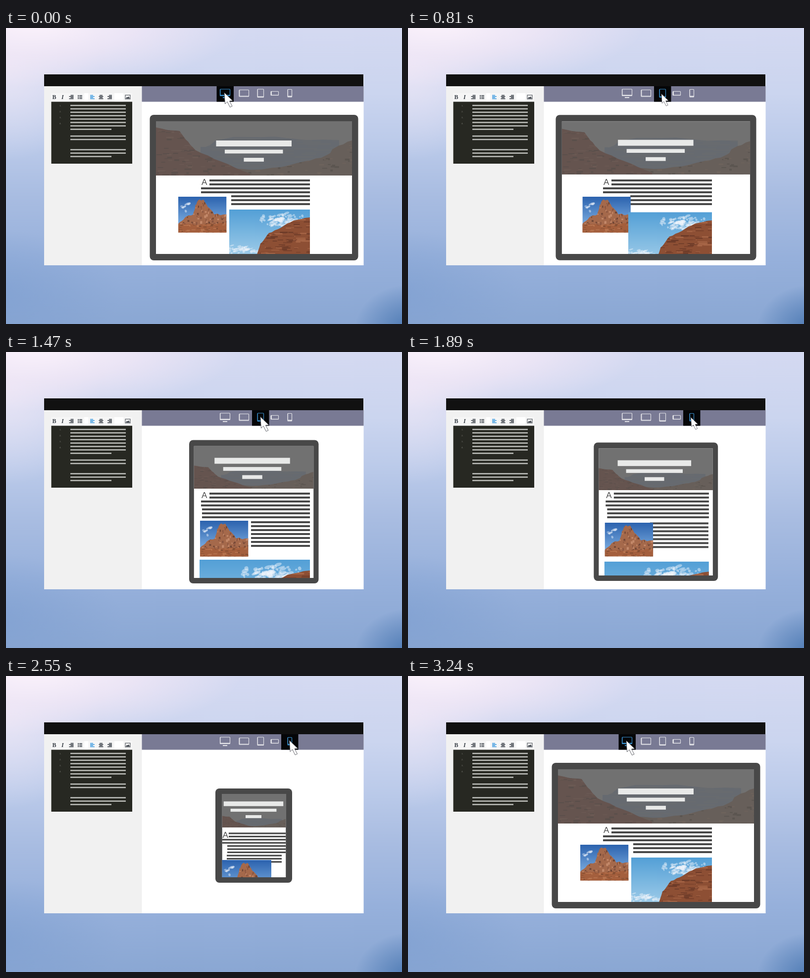
Animation of 800x600 px, one loop 3420 ms. Source, as an HTML page with a canvas:

```html
<!DOCTYPE html>
<html lang="en">
<head>
<meta charset="utf-8">
<title>Responsive preview</title>
<style>
html, body { margin: 0; width: 100%; height: 100%; overflow: hidden; }
body {
  background:
    radial-gradient(ellipse 110px 90px at 815px 610px, #4c79b3, #4c79b300),
    radial-gradient(ellipse 260px 130px at -30px 540px, #7d9ed0aa, #7d9ed000),
    radial-gradient(ellipse 420px 130px at 60px -10px, #fbf2fb, #f0e7f6cc 50%, #e6e1f400),
    radial-gradient(ellipse 190px 200px at 0 70px, #f1e9f7cc, #e6e3f400),
    linear-gradient(#d4d9f1, #cbd5ef 22%, #bccbea 38%, #a8bce1 57%, #96b0db 78%, #8aa7d3);
}
canvas { display: block; }
</style>
</head>
<body>
<canvas id="stage" width="800" height="600"></canvas>
<script>
const ctx = document.getElementById('stage').getContext('2d');
const LOOP = 3420, STEP = 30;
const DARK = '#484848', INK = '#3c424a', BLUE = '#398ecb';
const SERIF = '"Liberation Serif", Times, serif';

// Boxes are [left, top, right, bottom]. Each part of a layout moves in its own time span.
const desktop = {
  bezel: [290.5, 176, 711.5, 471],
  screen: { box: [303, 189, 699, 458], heroEnd: 299, heroScale: 1 },
  text: { y: 309, gap: 8 },
  content: {
    scale: 1, barX: 500.7, barY: 234, left: 394, wrap: 455, right: 614,
    butteX: 348, butteY: 342, butteW: 97.5, butteH: 72.5, cliffX: 451, cliffY: 368,
    sideX: 495, sideY: 345, sideR: 415, sideRows: 7
  }
};
const tablet = {
  bezel: [370, 178.5, 631.5, 469],
  screen: { box: [379.5, 190.5, 621.5, 458], heroEnd: 277, heroScale: .48 },
  text: { y: 287, gap: 8 },
  content: { ...desktop.content, barX: 497.5, barY: 220.5, wrap: 396, butteX: 392, cliffX: 391, cliffY: 421, sideR: 614 }
};
const phone = {
  bezel: [423, 228, 578, 419],
  screen: { box: [436.5, 239, 565.5, 408], heroEnd: 307, heroScale: .24 },
  text: { y: 319, gap: 6.4 },
  content: {
    scale: .79, barX: 500, barY: 259, left: 436.5, wrap: 447, right: 565,
    butteX: 436, butteY: 373, butteW: 100, butteH: 40, cliffX: 436, cliffY: 450,
    sideX: 446, sideY: 364, sideR: 557, sideRows: 3
  }
};

const resizes = [
  { from: desktop, to: tablet, bezel: [780, 1080], screen: [780, 1080], text: [810, 1080], content: [780, 1080] },
  { from: tablet, to: phone, bezel: [1860, 2160], screen: [1860, 2160], text: [1890, 2130], content: [1860, 2100] },
  { from: phone, to: desktop, bezel: [2940, 3240], screen: [3000, 3240], text: [3000, 3240], content: [3000, 3240] }
];
const spots = [[441, 131], [510.5, 131], [570, 130]];
const away = [745, 159];
const trips = [[310, 630], [1460, 1740], [2540, 2820]];
const clicks = [780, 1860, 2910];

const progress = (t, [a, b]) => Math.min(1, Math.max(0, (t - a) / (b - a)));
const smooth = u => u * u * (3 - 2 * u);

function mix(a, b, u) {
  if (typeof a === 'number') return a + (b - a) * u;
  if (Array.isArray(a)) return a.map((v, i) => mix(v, b[i], u));
  return Object.fromEntries(Object.keys(a).map(k => [k, mix(a[k], b[k], u)]));
}

function randomizer(seed) {
  return () => (seed = (seed * 16807) % 2147483647) / 2147483647;
}

function rect(l, t, r, b, fill) {
  ctx.fillStyle = fill;
  ctx.fillRect(l, t, r - l, b - t);
}
function line(l, r, y, thick, fill) {
  if (r > l) rect(l, y - thick / 2, r, y + thick / 2, fill);
}
function round(l, t, r, b, radius) {
  ctx.beginPath();
  ctx.roundRect(l, t, r - l, b - t, radius);
}
function poly(points, fill) {
  ctx.beginPath();
  points.forEach(([x, y]) => ctx.lineTo(x, y));
  ctx.closePath();
  ctx.fillStyle = fill;
  ctx.fill();
}
function text(str, x, y, font, fill) {
  ctx.font = font;
  ctx.fillStyle = fill;
  ctx.fillText(str, x, y);
}

// Shows a drawing made in its own units inside a box.
function picture([l, t, r, b], sx, sy, top, draw) {
  ctx.save();
  ctx.beginPath();
  ctx.rect(l, t, r - l, b - t);
  ctx.clip();
  ctx.translate(l, top);
  ctx.scale(sx, sy);
  draw();
  ctx.restore();
}
function sky(w, h, top, bottom) {
  const g = ctx.createLinearGradient(0, 0, 0, h);
  g.addColorStop(0, top);
  g.addColorStop(1, bottom);
  rect(0, 0, w, h, g);
}
function cloud(seed, n, x, y, w, h) {
  const rnd = randomizer(seed);
  for (let i = 0; i < n; i++) {
    ctx.beginPath();
    ctx.ellipse(x + (rnd() + rnd() - 1) * w, y + (rnd() + rnd() - 1) * h, 1 + rnd() * 5, 1 + rnd() * 2, -.3, 0, 7);
    ctx.fillStyle = '#f0f5fb77';
    ctx.fill();
  }
}

// Rock below a rough skyline through the key points, with random strata.
function rock(seed, keys, bottom, rough, [base, ...shades], w, h) {
  const rnd = randomizer(seed), skyline = [];
  const [x0] = keys[0], [x1] = keys.at(-1);
  keys.slice(1).forEach((end, i) => {
    for (let u = 0; u < 1; u += .25) {
      const [x, y] = mix(keys[i], end, u);
      skyline.push([x, y + (rnd() - .5) * rough]);
    }
  });
  ctx.save();
  poly([...skyline, keys.at(-1), [x1, bottom], [x0, bottom]], base);
  ctx.clip();
  for (let i = 0; i < 150; i++) {
    const x = x0 + rnd() * (x1 - x0), y = bottom * rnd();
    rect(x, y, x + w * (.4 + rnd()), y + h * (.4 + rnd()), shades[i % shades.length]);
  }
  ctx.restore();
}

function drawHero({ box: [l, t, r], heroEnd, heroScale }) {
  rect(l, t, r, heroEnd, '#717171');
  picture([l, t, r, heroEnd], (r - l) / 396, heroScale, heroEnd - 110 * heroScale, () => {
    rock(5, [[90, 56], [130, 36], [240, 32], [370, 38]], 110, 8, ['#666a70', '#686b6f'], 40, 3);
    rock(17, [[150, 98], [235, 96], [300, 81], [345, 70], [360, 55], [396, 39]], 110, 4, ['#675f5a', '#5b5550', '#6e635c'], 8, 3);
    rock(41, [[0, 14], [48, 19], [60, 36], [80, 60], [130, 81], [190, 106]], 110, 3, ['#65544f', '#5a4f4b', '#6b5a54'], 11, 2.5);
  });
}

function drawButte({ butteX: x, butteY: y, butteW: w, butteH: h }) {
  picture([x, y, x + w, y + h], w / 98, w / 98, y, () => {
    sky(98, 60, '#2b62ae', '#7fb0e2');
    cloud(5, 9, 16, 20, 14, 12);
    rock(23, [[0, 57], [14, 43], [30, 36], [35, 18], [41, 7], [52, 6], [60, 21], [73, 36], [98, 36]], 74, 4, ['#a5694b', '#6d4434', '#c4896a', '#8a5540'], 3, 4);
    rock(61, [[0, 58], [50, 56], [98, 53]], 74, 3, ['#a45f3d', '#78482f', '#bf7d57'], 6, 1.5);
  });
}

function drawCliff({ cliffX: x, cliffY: y, right }) {
  const s = (right - x) / 163;
  picture([x, y, right, 500], s, s, y, () => {
    sky(163, 100, '#539fd6', '#a3cfea');
    cloud(9, 110, 105, 22, 48, 17);
    cloud(31, 40, 30, 80, 40, 10);
    rock(77, [[55, 95], [63, 70], [80, 48], [104, 36], [130, 22], [163, 16]], 132, 2, ['#8d4f34', '#6b3a28', '#a76647', '#7c432d'], 14, 2);
  });
}

function poseAt(t) {
  const move = resizes.findLast(m => t >= m.bezel[0]) || resizes[0];
  const parts = Object.keys(desktop);
  return Object.fromEntries(parts.map(k => [k, mix(move.from[k], move.to[k], progress(t, move[k]))]));
}

function drawPage({ y, gap }, c) {
  const thick = 4 * c.scale;
  [152.5, 117.5, 40.5].forEach((w, i) => {
    const half = w / 2 * c.scale;
    line(c.barX - half, c.barX + half, c.barY + i * 16.5 * c.scale, (i ? 7.7 : 12) * c.scale, '#e8e9e8');
  });
  text('A', c.left + 1, y + 9.3, '17px "Liberation Sans", Arial, sans-serif', DARK);
  for (let i = 0; i < 7; i++) {
    const x = i < 2 ? c.left + 17 * c.scale : i < 4 ? c.left : c.wrap;
    line(x, c.right, y + i * gap, thick, DARK);
  }
  for (let i = 0; i < Math.round(c.sideRows); i++) line(c.sideX, c.sideR, c.sideY + i * gap, thick, DARK);
  drawButte(c);
  drawCliff(c);
}

function drawDevice(t) {
  const { bezel, screen, text, content } = poseAt(t);
  round(...bezel, 8);
  ctx.fillStyle = DARK;
  ctx.fill();
  ctx.save();
  round(...screen.box, 0);
  ctx.clip();
  rect(...screen.box, '#fff');
  drawHero(screen);
  drawPage(text, content);
  ctx.restore();
}

function drawEditor() {
  rect(77, 118, 274.5, 481, '#f1f1f1');
  rect(91, 132, 255, 149.5, '#f6f6f6');
  rect(158, 132, 166, 149, '#fff');
  rect(219, 132, 237, 149, '#fff');
  text('B', 93.5, 144, 'bold 12px ' + SERIF, INK);
  text('I', 112, 144, 'italic bold 12px ' + SERIF, INK);
  const rows = (x, color, align) => {
    for (let i = 0; i < 4; i++) {
      const w = i % 2 ? 9 : 6, l = x + (9 - w) * align;
      line(l, l + w, 136.5 + i * 2.3, 1.6, color);
    }
  };
  rows(127.5, INK, 1);
  for (let y = 137; y < 145; y += 3) {
    line(145, 147, y, 2, INK);
    line(148, 154, y, 1.6, INK);
  }
  rows(170, '#469fe0', 0);
  rows(187.5, INK, .5);
  rows(205, INK, 1);
  ctx.strokeStyle = INK;
  ctx.lineWidth = 1;
  ctx.strokeRect(241, 136, 10, 8);
  poly([[242, 143], [244.5, 139.5], [246, 141], [248, 138.5], [250, 143]], INK);

  rect(91.5, 149.5, 255, 275, '#272822');
  for (let i = 0; i < 4; i++) text(i + 1 + '.', 108, 159 + i * 12, '5px ' + SERIF, '#85857e');
  // One mark per row: full line, short line or blank.
  [...'=======- ==  ==-'].forEach((mark, i) => {
    if (mark !== ' ') line(130, mark === '=' ? 242 : 213, 157 + i * 6.9, 2.5, '#bfc0bc');
  });
}

function drawIcons(active) {
  rect(274.5, 118, 722.5, 149.5, '#797a94');
  const left = [425.5, 497, 556][active];
  rect(left, 118, left + 34.5, 149.5, '#050608');
  const color = i => i === active ? BLUE : '#e2e2e7';
  const outline = (l, t, r, b, c, side = 1.2, base = side) => {
    round(l, t, r, b, 1);
    ctx.strokeStyle = c;
    ctx.lineWidth = 1.2;
    ctx.stroke();
    line(l, r, b - base / 2, base, c);
    rect(l, t, l + side, b, c);
  };
  outline(432.5, 124, 452.5, 137.5, color(0), 1, 2);
  line(438, 447, 141, 2, color(0));
  outline(471, 125.5, 490.5, 139, color(), 1.5);
  outline(508, 124, 520.5, 140.5, color(1), 1, 2);
  outline(535, 128.5, 550.5, 136.5, color(), 2, 1);
  outline(569, 124.5, 577.5, 140, color(2), 1, 2.5);
}

function activeTab(t) {
  return trips.filter(trip => progress(t, trip) >= .8).length % 3;
}

function drawCursor(t) {
  const i = trips.findLastIndex(([a]) => t >= a);
  let tip = spots[0];
  if (i >= 0) {
    const u = progress(t, trips[i]) * 2;
    tip = u < 1 ? mix(spots[i], away, smooth(u)) : mix(away, spots[(i + 1) % 3], smooth(u - 1));
  }
  const press = clicks.find(c => t >= c && t < c + 150);
  const size = press === undefined ? 1 : 1 - .5 * Math.sin(Math.PI * (t - press) / 150) ** 2;
  ctx.save();
  ctx.translate(tip[0] + 8.5, tip[1] + 15);
  ctx.scale(size, size);
  ctx.translate(-8.5, -15);
  poly([[0, 0], [1.5, 23], [6, 18.5], [11.5, 29.5], [16, 27.5], [10.5, 17], [17, 16.5]], '#fff');
  ctx.strokeStyle = '#55565e';
  ctx.lineWidth = .9;
  ctx.stroke();
  ctx.restore();
}

function draw(now) {
  const t = Math.floor(now % LOOP / STEP) * STEP;
  ctx.clearRect(0, 0, 800, 600);
  rect(77, 94, 722.5, 481, '#fff');
  rect(77, 94, 722, 118, '#111');
  drawEditor();
  drawIcons(activeTab(t));
  drawDevice(t);
  drawCursor(t);
}

let start;
function tick(now) {
  start ??= now;
  draw(now - start);
  requestAnimationFrame(tick);
}
requestAnimationFrame(tick);
</script>
</body>
</html>
```
